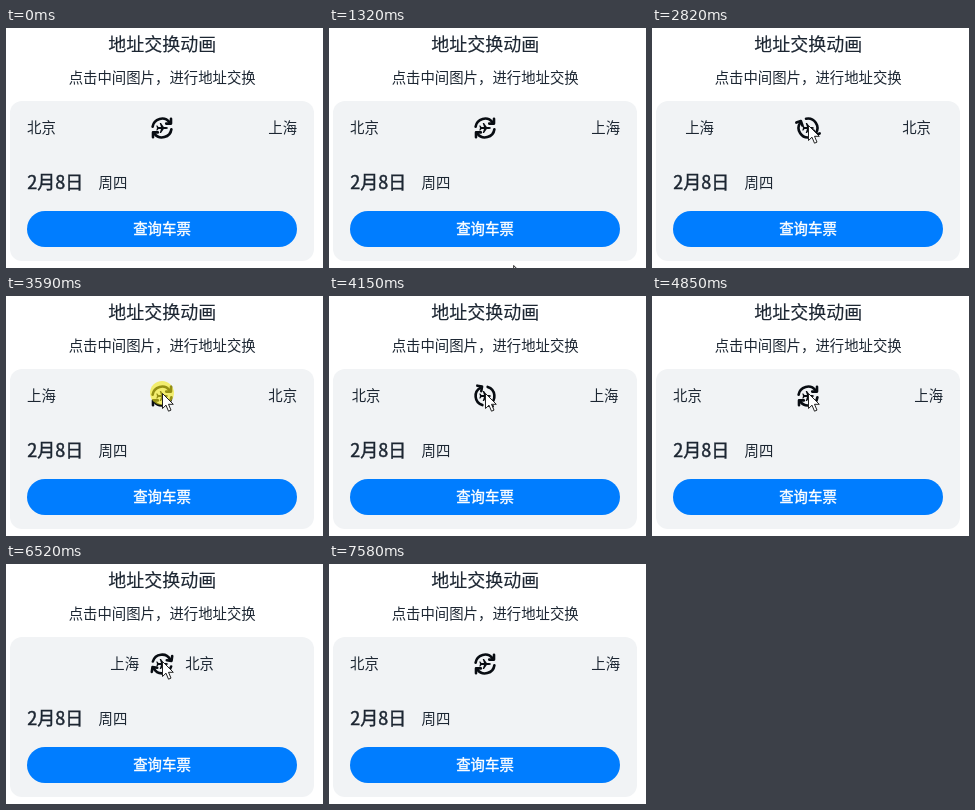
Animation of 317 by 240 pixels, one loop 7910 ms. Source, as an HTML page:

```html
<!DOCTYPE html>
<html lang="zh-CN">
<head>
<meta charset="utf-8">
<title>地址交换动画</title>
<style>
  html, body { margin: 0; width: 100%; height: 100%; overflow: hidden; background: #fff; }
  svg { display: block; width: 317px; height: 240px; }
  text { font: 14.4px "Noto Sans CJK SC", "Noto Sans CJK", sans-serif; fill: #1c2632; }
  .mid { text-anchor: middle; }
  .big { font-size: 18px; }
  .medium { stroke: #1c2632; stroke-width: .4; }
  .label { fill: #fff; stroke: #fff; stroke-width: .4; }
  .ink { fill: none; stroke: #080c12; stroke-width: 2.6; stroke-linejoin: round; stroke-linecap: round; }
</style>
</head>
<body>
<svg viewBox="0 0 317 240">
  <defs>
    <g id="arrow">
      <path class="ink" d="M-9.4 -1.2A9.5 9.5 0 0 1 7.6 -5.6"/>
      <path class="ink" d="M9 -9.2V-4.4H4.2"/>
    </g>
  </defs>
  <text class="mid big" x="156.3" y="22.5" stroke="#1c2632" stroke-width=".15">地址交换动画</text>
  <text class="mid" x="156.2" y="55">点击中间图片，进行地址交换</text>
  <rect x="4" y="73" width="304" height="160" rx="12" fill="#f1f3f5"/>
  <text class="big medium" x="21.2" y="161.4">2月8日</text>
  <text x="92.6" y="160.2">周四</text>
  <rect x="21" y="183" width="270" height="36" rx="18" fill="#007dff"/>
  <text class="mid label" x="156" y="206.3">查询车票</text>

  <text id="from" y="105.2">北京</text>
  <text id="to" y="105.2">上海</text>
  <g transform="translate(156 100)">
    <g id="ring">
      <use href="#arrow"/>
      <use href="#arrow" transform="rotate(180)"/>
    </g>
    <path fill="#080c12" d="M6 0Q5.6 -1 4 -1H1.8L-1 -5H-2.3L-1 -1H-3.5L-4.7 -2.5H-5.7L-5 0L-5.7 2.5H-4.7L-3.5 1H-1L-2.3 5H-1L1.8 1H4Q5.6 1 6 0Z"/>
  </g>
  <circle id="press" cx="156" cy="97" r="12" fill="#f4ea16" fill-opacity=".6"/>
  <path id="cursor" fill="#fff" stroke="#222" stroke-width="1" stroke-linejoin="round"
        d="M.5 .5V15.5L4 12.2L6.5 18.2L9 17.1L6.5 11.3H11.3Z"/>
</svg>
<script>
  const LOOP = 7910, SLIDE = 500, SPIN = 1150;
  const LEFT = 21.1, RIGHT = 262.3;
  // Each click: press, release, start of the swap
  const clicks = [[2150, 2280, 2400], [3590, 3720, 3680], [5050, 5130, 5100], [6200, 6330, 6317]];
  const enter = { start: 1250, end: 2020, points: [[186, 240], [132, 150], [156, 97]] };
  const leave = { start: 6800, end: 7510, points: [[156, 97], [240, 165], [250, 242]] };
  const [from, to, ring, press, cursor] =
    ["from", "to", "ring", "press", "cursor"].map(id => document.getElementById(id));

  const clamp = v => Math.min(1, Math.max(0, v));

  // cubic-bezier(.42, 0, .58, 1)
  function easeInOut(x) {
    if (x <= 0 || x >= 1) return clamp(x);
    let lo = 0, hi = 1;
    for (let i = 0; i < 22; i++) {
      const s = (lo + hi) / 2, r = 1 - s;
      if (1.26 * r * r * s + 1.74 * r * s * s + s * s * s < x) lo = s; else hi = s;
    }
    return lo * lo * (3 - 2 * lo);
  }

  function cubicInOut(x) {
    const v = clamp(x);
    return v < .5 ? 4 * v ** 3 : 1 - 4 * (1 - v) ** 3;
  }

  function along({ start, end, points: [a, b, c] }, t) {
    const s = easeInOut((t - start) / (end - start)), r = 1 - s;
    return [0, 1].map(i => r * r * a[i] + 2 * r * s * b[i] + s * s * c[i]);
  }

  function draw(t) {
    let swap = 0, angle = 0;
    clicks.forEach(([, , start], i) => {
      swap += (i % 2 ? -1 : 1) * easeInOut((t - start) / SLIDE);
      angle += 360 * cubicInOut((t - start) / SPIN);
    });
    const shift = (RIGHT - LEFT) * swap;
    from.setAttribute("x", LEFT + shift);
    to.setAttribute("x", RIGHT - shift);
    ring.setAttribute("transform", `rotate(${angle % 360})`);

    const pressed = clicks.some(([down, up]) => t >= down && t < up);
    press.style.display = pressed ? "" : "none";

    const shown = t >= enter.start && t < leave.end;
    const [x, y] = along(t < leave.start ? enter : leave, t);
    cursor.style.display = shown ? "" : "none";
    cursor.setAttribute("transform", `translate(${x} ${y})`);
  }

  const begin = performance.now();
  function tick() {
    draw((performance.now() - begin) % LOOP);
    requestAnimationFrame(tick);
  }
  tick();
</script>
</body>
</html>
```
